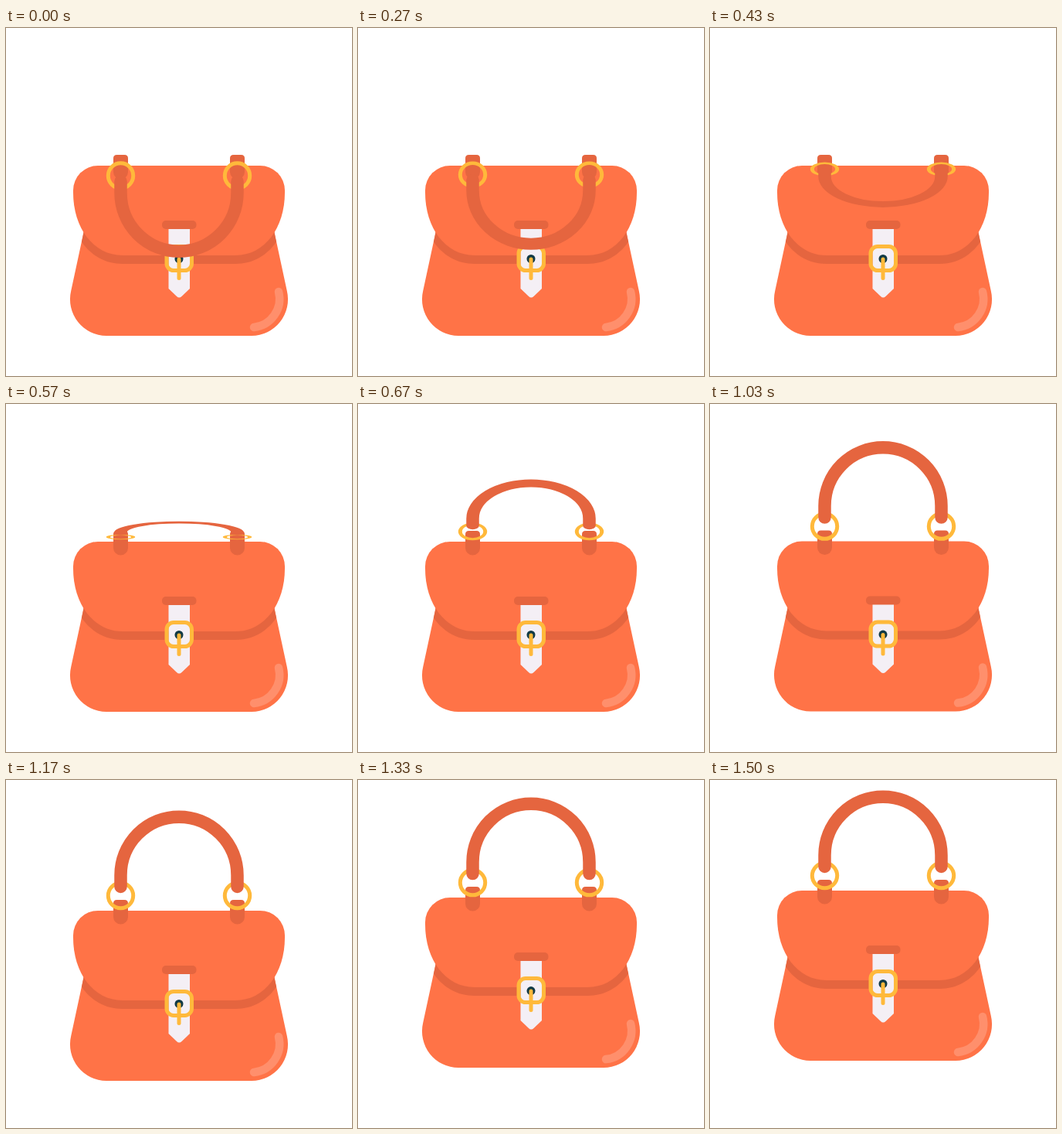
Animation of 448 by 450 pixels, one loop 1.53 s. Source, as an HTML page:

```html
<!DOCTYPE html>
<html lang="en">
<head>
<meta charset="utf-8">
<title>Handbag</title>
<style>
  html, body { margin: 0; width: 100%; height: 100%; overflow: hidden; background: #fff; }
  svg { display: block; width: 100vw; height: 100vh; }
  .skin { fill: #ff7347; }
  .dark { fill: #e5653f; }
  .gold { fill: none; stroke: #ffb93b; stroke-width: 5; stroke-linecap: round; }
</style>
</head>
<body>
<svg viewBox="0 0 448 450">
  <g id="bag">
    <path class="skin" d="M101 262 L84.2 340 A47.2 47.2 0 0 0 130 398 H318 A47.2 47.2 0 0 0 363.8 340 L347 262Z"/>
    <path class="dark" d="M101 262 L98 276.500 C110 294 128 305 151 305 H297 C320 305 338 294 350 276.500 L347 262Z"/>
    <path class="skin" d="M119 178 H329 A32 32 0 0 1 361 210 V213 C361 258 335 294 297 294 H151 C113 294 87 258 87 213 V210 A32 32 0 0 1 119 178Z"/>
    <path d="M353 341 A37 37 0 0 1 321 387" fill="none" stroke="#ff8f6c" stroke-width="10.500" stroke-linecap="round"/>

    <path d="M210.500 256 H238 V337 L227.500 347 Q224.200 350 221 347 L210.500 337Z" fill="#f4eff5"/>
    <rect class="dark" x="202" y="249" width="44.500" height="11" rx="5"/>
    <circle cx="224" cy="298.500" r="5.500" fill="#123a45"/>
    <rect class="gold" x="208" y="282.500" width="32.500" height="31" rx="9"/>
    <path class="gold" d="M224 299 V323.500"/>

    <path id="stub" class="dark" d="M139 168.500 Q139 164 143.500 164 H153.500 Q158 164 158 168.500 V186 A9.500 9.500 0 0 1 139 186Z"/>
    <use href="#stub" x="151"/>
    <g id="rings" class="gold">
      <circle cx="148.500" cy="-16.200" r="16.200"/>
      <circle cx="299.500" cy="-16.200" r="16.200"/>
    </g>
    <path id="handle" d="M148.500 -25.700 V-40.500 A75.500 75.500 0 0 1 299.500 -40.500 V-25.700"
      fill="none" stroke="#e5653f" stroke-width="16.500" stroke-linecap="round"/>
  </g>
</svg>
<script>
  const LOOP = 1530, FPS = 30;
  const [bag, rings, handle] = ['bag', 'rings', 'handle'].map(id => document.getElementById(id));

  const clamp = x => Math.min(1, Math.max(0, x));
  const smooth = x => x * x * (3 - 2 * x);

  // cubic-bezier(.42, 0, .58, 1), solved by bisection
  function easeInOut(x) {
    let lo = 0, hi = 1;
    for (let i = 0; i < 24; i++) {
      const m = (lo + hi) / 2, r = 1 - m;
      if (1.26 * r * r * m + 1.74 * r * m * m + m * m * m < x) lo = m;
      else hi = m;
    }
    return smooth(lo);
  }

  function draw(ms) {
    const step = Math.floor((ms + 3.4) * FPS / 1000);
    const flip = -Math.cos(Math.PI * easeInOut(clamp(step / 32)));
    const lift = -35 * smooth(clamp((step - 30) / 15));
    bag.setAttribute('transform', `translate(0 ${lift})`);
    rings.setAttribute('transform', `translate(0 174.800) scale(1 ${flip})`);
    handle.setAttribute('transform', `translate(0 172.700) scale(1 ${flip})`);
  }

  const start = performance.now();
  function tick() {
    draw((performance.now() - start) % LOOP);
    requestAnimationFrame(tick);
  }
  tick();
</script>
</body>
</html>
```
